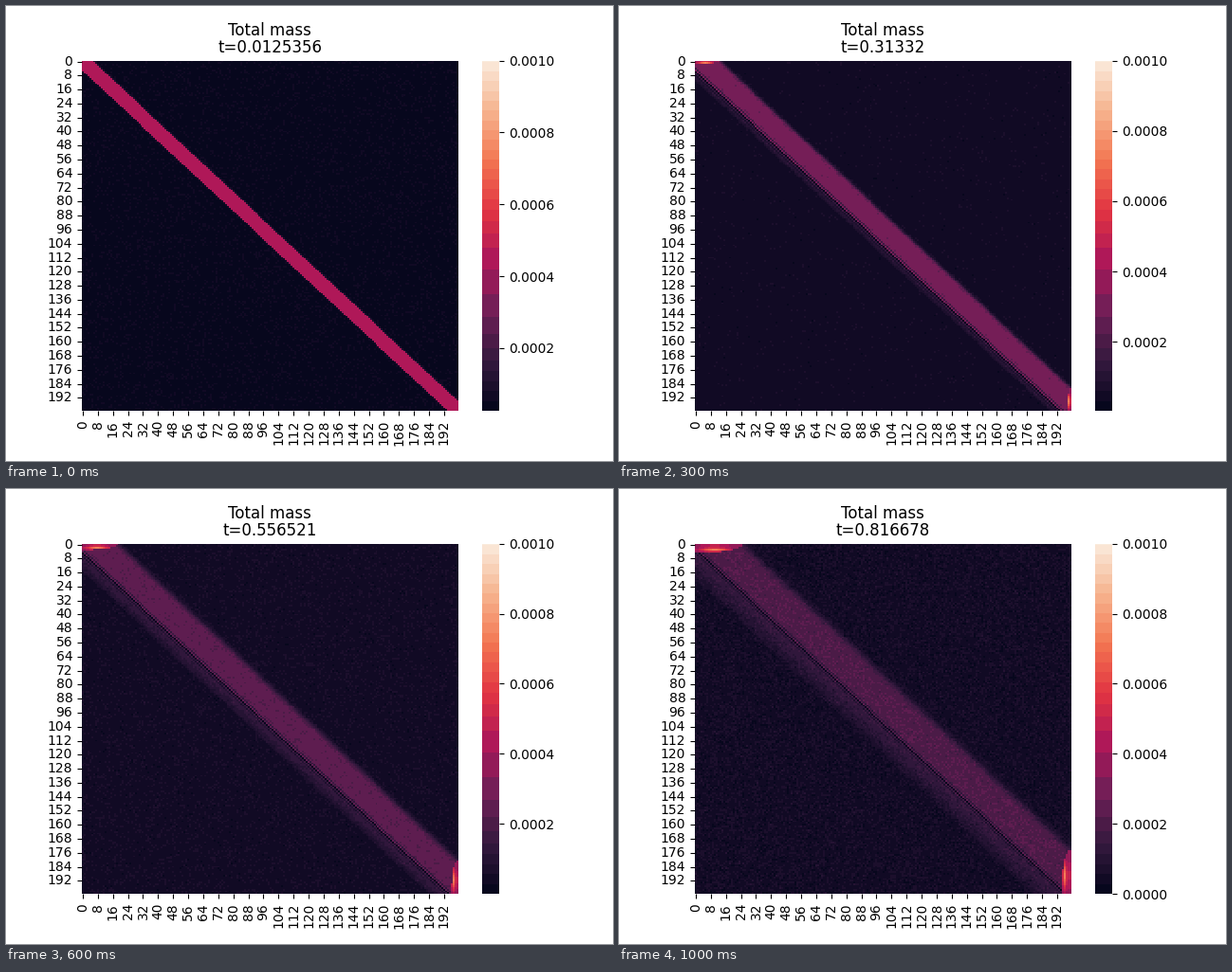
These frames come from a looping animation (640x480 px, 1.1 s). A matplotlib script:

```python
import numpy as np
import matplotlib.pyplot as plt
from matplotlib.animation import FuncAnimation
from matplotlib.colors import LinearSegmentedColormap, ListedColormap

N = 200
FRAMES = 11
UNIT = 1e-3
GROUND = 0.047

# Simulation clock: key steps and the times they show
STEPS = [0, 1, 2, 4, 6, 8, 10]
TIMES = [0.0125356, 0.127648, 0.234092, 0.392548, 0.556521, 0.709094, 0.816678]


def banded_ramp():
    """Dark-to-cream ramp in flat bands, widest in the purples."""
    ramp = LinearSegmentedColormap.from_list("ramp", [
        "#03051a", "#35193e", "#701f57", "#ad1759",
        "#e13342", "#f37651", "#f6b48f", "#faebdd"])
    edges = [0.0]
    while edges[-1] < 1:
        e = edges[-1]
        edges.append(e + 0.028 + 0.045 * np.exp(-((e - 0.33) / 0.13) ** 2))
    edges = np.array(edges)
    colors = ramp((edges[:-1] + edges[1:]) / 2)
    level = (np.arange(512) + 0.5) / 512
    return ListedColormap(colors[np.searchsorted(edges, level) - 1])


def step(x, width):
    return 0.5 * (1 + np.tanh(x / width))


def smooth(x, lo, hi):
    s = np.clip((x - lo) / (hi - lo), 0, 1)
    return s * s * (3 - 2 * s)


rng = np.random.default_rng(7)
noise_a, noise_b = rng.standard_normal((2, N, N))
row, col = np.mgrid[0:N, 0:N].astype(float)
lag = col - row


def corner(t, front):
    """Mass piled up against the top edge."""
    depth = 6.5 * t - 0.5
    crest = np.floor(depth / 1.5)
    x = np.clip(col / front, 0, 1)
    glow = np.exp(-((x - 0.4) / 0.33) ** 2)
    ridge = np.exp(-((row - crest) / 0.8) ** 2)
    inside = row < depth * np.sqrt(1 - x ** 2)
    return np.where(inside, 0.34 + glow * (0.14 + 0.25 * ridge), 0)


def field(t, k):
    front = 5.3 + 24 * t
    back = -np.round(6 - 4.8 * t ** 2)
    tail = -5.5 - 19 * t
    body = 0.19 + 0.27 * np.exp(-3.3 * t)
    grown = smooth(t, 0.13, 0.24)

    # Main band with a fading wake below it
    band = step(front - lag, 0.35 + 3 * t) * step(lag - back - 0.5, 0.35)
    fall = np.clip((lag - tail) / (back - tail), 0, 1) ** 0.7
    wake = grown * fall * step(back + 0.5 - lag, 0.35)
    mass = GROUND + (body - GROUND) * band + 0.11 * wake

    # Dark lines along the trailing edge
    off = lag - back
    lines = np.exp(-(off / 2.2) ** 2) * np.cos(np.pi * off / 2) ** 2
    mass *= 1 - 0.9 * grown * lines

    grain = noise_a * np.cos(0.9 * k) + noise_b * np.sin(0.9 * k)
    mass += (0.0048 + 0.016 * t ** 2) * grain

    pile = corner(t, front)
    mass = np.maximum(mass, np.maximum(pile, pile[::-1, ::-1].T))
    return np.clip(mass, 0.004 * max(0, 1 - t / 0.6), 1) * UNIT


fig, ax = plt.subplots(figsize=(6.4, 4.8), dpi=100)
mesh = ax.pcolormesh(np.zeros((N, N)), cmap=banded_ramp(), vmin=0, vmax=UNIT)
ax.set(xlim=(0, N), ylim=(N, 0))
ax.spines[:].set_visible(False)
labels = np.arange(0, N, 8)
ax.set_xticks(labels + 0.5, labels, rotation="vertical")
ax.set_yticks(labels + 0.5, labels, va="center")
bar = fig.colorbar(mesh, ax=ax)
bar.outline.set_linewidth(0)
title = ax.set_title("", linespacing=1.0)


def update(k):
    t = np.interp(k, STEPS, TIMES)
    mass = field(t, k)
    mesh.set_array(mass)
    mesh.set_clim(mass.min(), UNIT)
    title.set_text(f"Total mass\nt={t:.6g}")
    return mesh, title


anim = FuncAnimation(fig, update, frames=FRAMES, interval=100,
                     init_func=lambda: update(0), repeat=True, repeat_delay=0)
plt.show()
```
